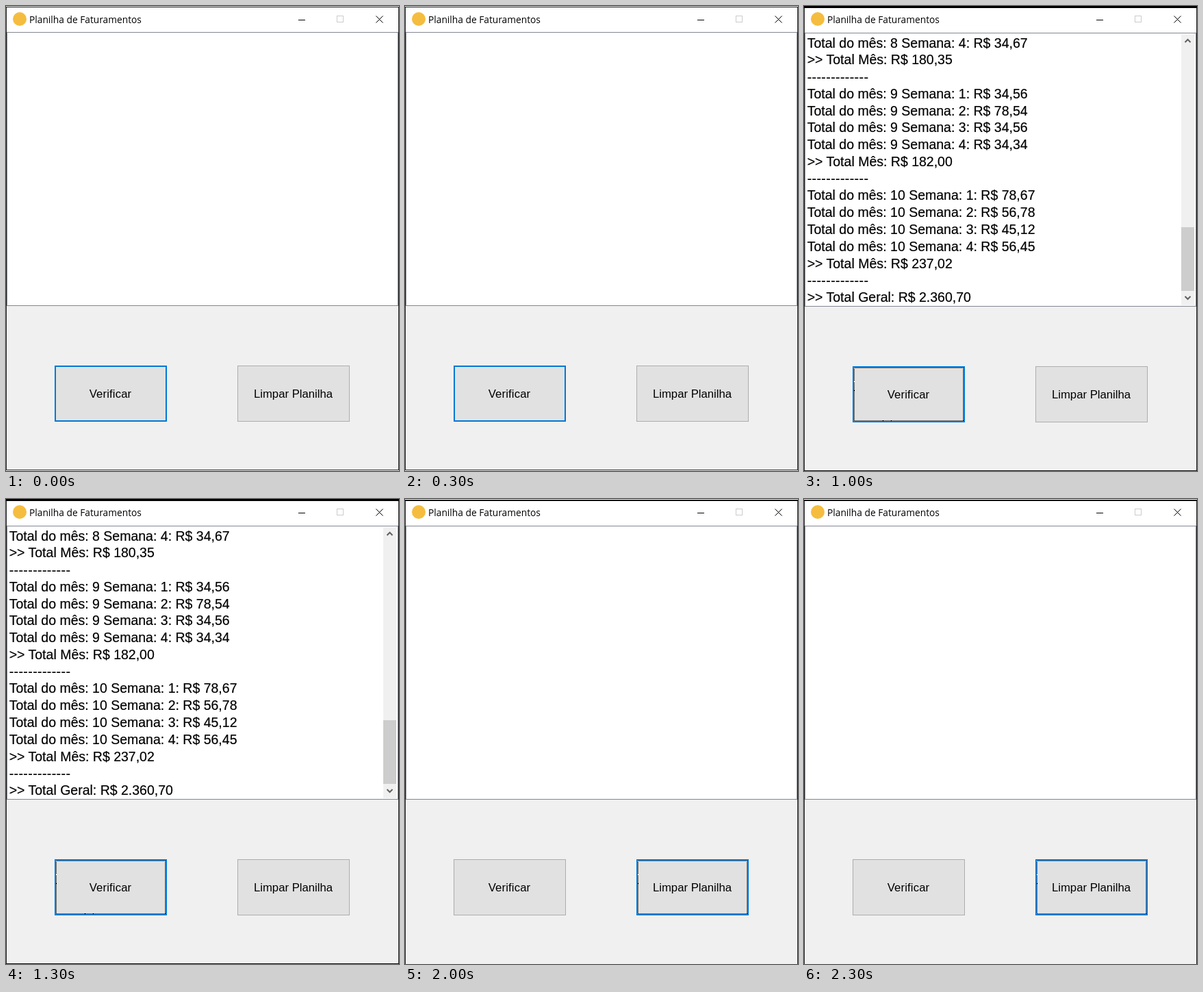
Recreate the animation shown at these times as an HTML page. Size 574 px wide and 679 px high, loop 2.5 s.

```html
<!DOCTYPE html>
<html lang="pt-BR">
<head>
<meta charset="utf-8">
<title>Planilha de Faturamentos</title>
<style>
  html, body { margin: 0; width: 100%; height: 100%; overflow: hidden; background: #fff; }
  svg { display: block; width: 574px; height: 679px; }
  rect, .line { shape-rendering: crispEdges; }
  text { font: 16.7px "Liberation Sans", Arial, sans-serif; fill: #000; white-space: pre; }
  .title { font: 13.75px "Open Sans", "Noto Sans", sans-serif; }
  .small { font-size: 13.9px; }
  .mid { text-anchor: middle; }
  .list text { font-size: 19.5px; stroke: #000; stroke-width: .2; }
  .list .rule { letter-spacing: .4px; }
  .face { fill: #e1e1e1; stroke: #adadad; }
  .ring { fill: none; stroke: #0078d7; stroke-width: 2; }
  .dots { fill: none; stroke: #000; stroke-dasharray: 1 1; }
  .glyph { fill: none; stroke: #000; }
  .box { fill: #fff; stroke: #828790; }
  .dialog { filter: drop-shadow(0 3px 7px rgba(0, 0, 0, .42)); }

  /* Five half-second steps; --at is the step where a part appears. */
  .one, .two, .main, .shift {
    animation: one 2.5s step-end infinite;
    animation-delay: calc(var(--at, 0) * .5s - 2.5s);
  }
  .two { animation-name: two; }
  .main { animation-name: main; }
  .shift { animation-name: shift; }
  @keyframes one { 0% { visibility: visible } 20%, 100% { visibility: hidden } }
  @keyframes two { 0% { visibility: visible } 40%, 100% { visibility: hidden } }
  @keyframes main { 0% { opacity: 1 } 20% { opacity: 0 } 40%, 100% { opacity: 1 } }
  @keyframes shift { 0% { transform: translateY(-1px) } 20%, 100% { transform: none } }
</style>
</head>
<body>
<svg viewBox="0 0 574 679">
  <defs>
    <rect id="face" class="face" x=".5" y=".5" width="163" height="81"/>
    <rect id="ring" class="ring" x="1" y="1" width="162" height="80"/>
    <rect id="dots" class="dots" x="2.5" y="2.5" width="159" height="77"/>
    <path id="cross" d="M0 0L10 10M10 0L0 10"/>
  </defs>

  <g class="main">
    <rect width="574" height="679" fill="#f0f0f0"/>
    <rect width="574" height="39" fill="#fff"/>
    <circle cx="20" cy="19" r="10" fill="#f5bd3f"/>
    <text class="title" x="34" y="25">Planilha de Faturamentos</text>
    <path class="glyph line" d="M427 20.5h10"/>
    <rect class="glyph" x="483.5" y="14.5" width="9" height="9" style="stroke:#ccc"/>
    <use href="#cross" class="glyph" x="540.5" y="14.5"/>

    <g class="shift">
      <rect class="box" x="1.5" y="39.5" width="571" height="399"/>
      <use href="#face" x="71" y="526"/>
      <use href="#face" x="338" y="526"/>
      <text class="mid" x="152.5" y="573" letter-spacing=".15">Verificar</text>
      <text class="mid" x="419.5" y="573">Limpar Planilha</text>
      <use href="#ring" class="one" x="71" y="526"/>
    </g>

    <g class="one" style="--at:2">
      <use href="#ring" x="71" y="526"/>
      <use href="#dots" x="71" y="526"/>
    </g>
    <g class="two" style="--at:3">
      <use href="#ring" x="338" y="526"/>
      <use href="#dots" x="338" y="526"/>
    </g>

    <g class="list two" style="--at:2">
      <g id="rows"></g>
      <rect x="551" y="41" width="19" height="396" fill="#f0f0f0"/>
      <rect x="551" y="323" width="19" height="93" fill="#cdcdcd"/>
      <path d="M556.5 53l4-4l4 4M556.5 424l4 4l4-4" fill="none" stroke="#606060" stroke-width="2"/>
    </g>

    <path class="line" d="M.5 1V679M573.5 1V679" stroke="#222"/>
    <g class="one">
      <rect width="574" height="1" fill="#fff"/>
      <rect y="1" width="574" height="1" fill="#111"/>
      <rect y="677" width="574" height="1" fill="#222"/>
      <rect y="678" width="574" height="1" fill="#fff"/>
    </g>
    <g class="one" style="--at:2">
      <rect width="574" height="3" fill="#000"/>
      <rect y="678" width="574" height="1" fill="#111"/>
    </g>
    <g class="two" style="--at:3">
      <rect width="574" height="1" fill="#fff"/>
      <rect y="1" width="574" height="2" fill="#111"/>
    </g>
  </g>

  <g class="one" style="--at:1">
    <rect width="574" height="679" fill="#f0f0f0"/>
    <rect width="574" height="440" fill="#fff"/>
    <path class="line" d="M0 36.5H574M0 439.5H574" stroke="#828790"/>
    <circle cx="17" cy="17" r="10" fill="#f5bd3f"/>
    <text class="title" x="31" y="22.5" style="font-size:13.9px;fill:#999">Planilha de Faturamentos</text>
    <g class="glyph" style="stroke:#999">
      <path class="line" d="M428 17.5h10"/>
      <rect x="484.5" y="12.5" width="9" height="9" stroke="#e8e8e8"/>
      <use href="#cross" x="542" y="12"/>
    </g>
    <rect class="face" x="69.5" y="528.5" width="164" height="82"/>
    <rect class="ring" x="70" y="529" width="163" height="81"/>
    <rect class="face" x="338.5" y="528.5" width="164" height="82"/>
    <text class="mid" x="150.5" y="575" style="font-size:16.85px" letter-spacing=".15">Verificar</text>
    <text class="mid" x="420" y="575" style="font-size:16.85px">Limpar Planilha</text>

    <g class="dialog">
      <rect x="60.5" y="248.5" width="453" height="185" fill="#f0f0f0" stroke="#6b6b6b"/>
      <rect x="61" y="249" width="452" height="36" fill="#fff"/>
    </g>
    <text class="title" x="70" y="272">Mês #1</text>
    <use href="#cross" class="glyph" x="488" y="261"/>
    <text class="small" x="77" y="311">Semana #1</text>
    <rect class="face" x="433.5" y="301.5" width="74" height="24"/>
    <rect class="ring" x="434" y="302" width="73" height="23"/>
    <text class="small mid" x="469" y="319">OK</text>
    <rect class="face" x="433.5" y="335.5" width="74" height="24"/>
    <text class="small mid" x="469" y="353">Cancelar</text>
    <rect x="74.5" y="396.5" width="428" height="21" fill="#fff" stroke="#0078d7"/>
  </g>
</svg>
<script>
  const rule = '-'.repeat(13);
  const week = (month, n, value) => `Total do mês: ${month} Semana: ${n}: R$ ${value}`;
  const month = (m, values, total, first = 1) =>
    [...values.map((v, i) => week(m, first + i, v)), `>> Total Mês: R$ ${total}`, rule];

  const lines = [
    ...month(8, ['34,67'], '180,35', 4),
    ...month(9, ['34,56', '78,54', '34,56', '34,34'], '182,00'),
    ...month(10, ['78,67', '56,78', '45,12', '56,45'], '237,02'),
    '>> Total Geral: R$ 2.360,70'
  ];

  const rows = document.getElementById('rows');
  lines.forEach((line, i) => {
    const row = document.createElementNS('http://www.w3.org/2000/svg', 'text');
    row.setAttribute('x', 4.7);
    row.setAttribute('y', (line === rule ? 61.3 : 60.5) + i * 24.77);
    if (line === rule) row.setAttribute('class', 'rule');
    row.textContent = line;
    rows.append(row);
  });
</script>
</body>
</html>
```
